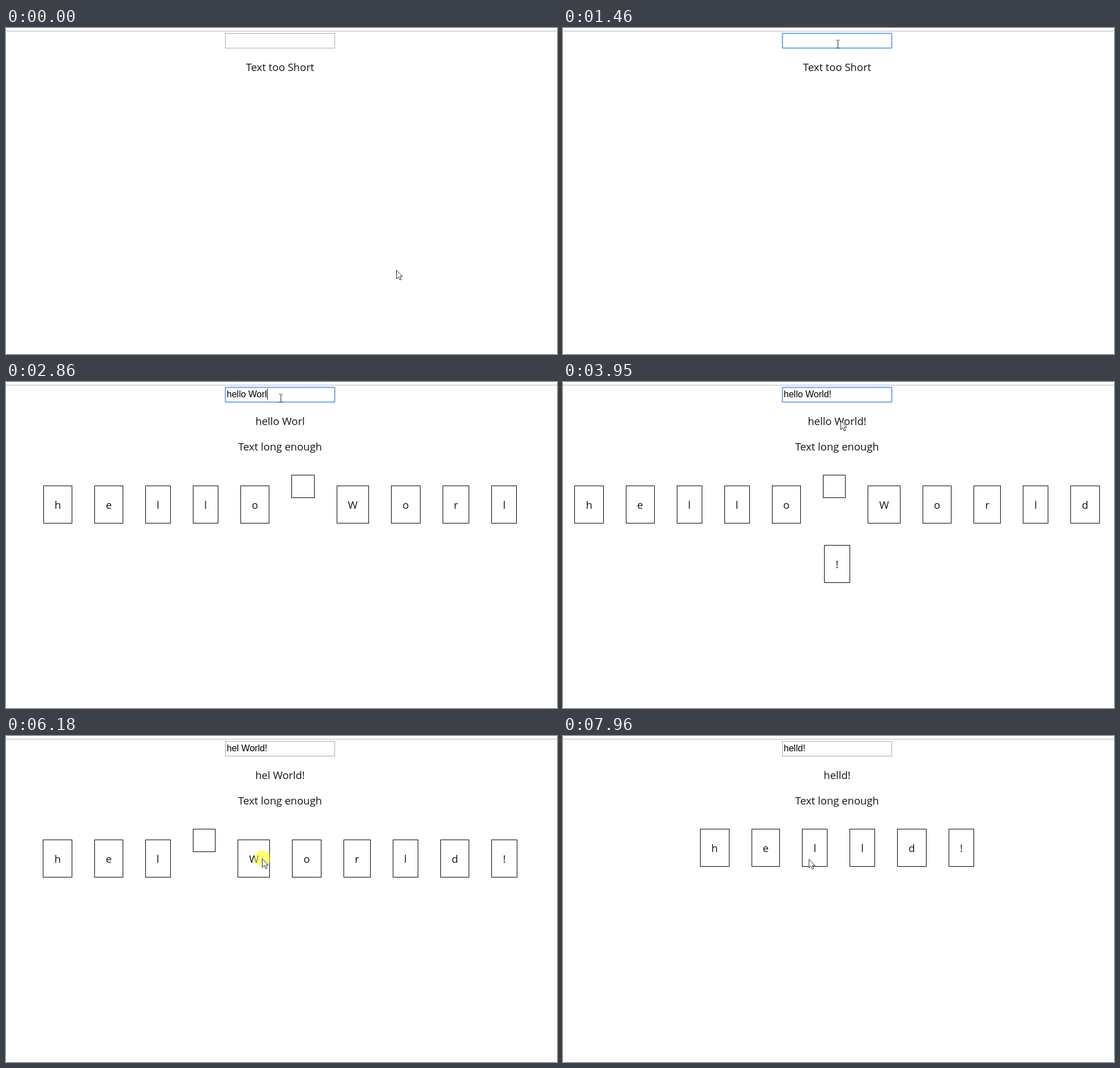
An HTML page for the animation above (8 s loop, 973 by 576 pixels).

```html
<!DOCTYPE html>
<html lang="en">
<head>
<meta charset="utf-8">
<title>Letter boxes</title>
<style>
  html, body { margin: 0; width: 100%; height: 100%; overflow: hidden; background: #fff; }
  svg { display: block; width: 973px; height: 576px; }
  text { font: 18.5px "Open Sans", "Noto Sans", sans-serif; text-anchor: middle; fill: #141414; }
  .typed { font: 16px "Liberation Sans", Arial, sans-serif; text-anchor: start; white-space: pre; fill: #000; }
  .box { fill: #fff; stroke: #000; shape-rendering: crispEdges; }
  .field { fill: #fff; stroke: #a9a9a9; }
  .field.focus { stroke: #6ea2ea; stroke-width: 2; }
</style>
</head>
<body>
<svg viewBox="0 0 973 576">
  <rect y="5" width="973" height="1" fill="#b6b6b6"/>
  <g id="page"></g>
  <g id="pointer">
    <circle id="halo" cx="1" cy=".5" r="14.5" fill="#ff0" fill-opacity=".5"/>
    <path id="arrow" d="M.5 .8V16.2L4.1 12.8 6.5 18.2 8.9 17.2 6.6 12H11.3Z" fill="#fff" stroke="#22223c"/>
    <path id="beam" d="M-2.5 -6.5H-.5L.5 -5.5 1.5 -6.5H3.5M.5 -5.5V6.5M-2.5 7.5H-.5L.5 6.5 1.5 7.5H3.5" fill="none" stroke="#222"/>
  </g>
</svg>
<script>
const LOOP = 8000, TICK = 76.3, BLINK = 545, GLIDE = 300;
const MID = 484, ROW_WIDTH = 968, FRAME = 40.4, GAP = 38.9;
const FIELD = { left: 387, right: 581, bottom: 36, textX: 389.8 };
const $ = id => document.getElementById(id);

// Typing comes in bursts: text, start, time per key
const bursts = [['hello', 1530, 138], [' W', 2330, 230], ['orld', 2710, 75], ['!', 3090, 0]];

// The pointer leaves for each stop, and presses there if it has a release time
const stops = [
  { leave: 70, press: 600, release: 690, x: 476, y: 40 },
  { leave: 830, press: 900, release: 1060, x: 485, y: 28 },
  { leave: 3870, press: 4030, x: 507, y: 192 },
  { leave: 4180, press: 4870, release: 4950, x: 390, y: 199 },
  { leave: 4950, press: 4950, x: 394, y: 210 },
  { leave: 5260, press: 5500, release: 5650, x: 312, y: 214 },
  { leave: 5730, press: 6180, release: 6260, x: 452, y: 216 },
  { leave: 6330, press: 6710, release: 6870, x: 564, y: 210 },
  { leave: 7180, press: 7330, release: 7410, x: 528, y: 208 },
  { leave: 7730, press: 7800, release: 7880, x: 478, y: 190 },
  { leave: 7960, press: 7960, x: 434, y: 217 }
];
const clicks = stops.filter(s => s.release);

const pen = document.createElement('canvas').getContext('2d');
function measure(s, font) {
  pen.font = font;
  return pen.measureText(s).width;
}
const glyphWidth = c => c === ' ' ? 0 : measure(c, '18.5px "Open Sans", "Noto Sans", sans-serif');
const typedWidth = s => measure(s, '16px "Liberation Sans", Arial, sans-serif');

// Boxes of one centred row; an empty box sits higher than its neighbours
function layRow(chars, top, spaced) {
  const widths = chars.map(c => glyphWidth(c) + FRAME);
  let x = MID - (widths.reduce((a, b) => a + b, 0) + GAP * (chars.length - 1)) / 2;
  return chars.map((c, i) => {
    const blank = c === ' ';
    const box = {
      c, blank, left: Math.round(x), right: Math.round(x + widths[i]), mid: x + widths[i] / 2,
      top: spaced && !blank ? top + 19 : top, height: blank ? 41 : 67
    };
    x += widths[i] + GAP;
    return box;
  });
}

function layout(s) {
  const first = [], rest = [];
  let used = 0;
  for (const c of s) {
    used += glyphWidth(c) + FRAME + GAP;
    (used > ROW_WIDTH ? rest : first).push(c);
  }
  return [...layRow(first, 164, s.includes(' ')), ...layRow(rest, 288, false)];
}

// Every state of the text: typed key by key, then clicked boxes drop out
const states = [{ at: 0, text: '' }];
const lastText = () => states[states.length - 1].text;
for (const [word, start, pace] of bursts)
  [...word].forEach((c, i) => states.push({ at: start + i * pace, text: lastText() + c }));
const typedStates = states.slice(1);
for (const { release, x, y } of clicks.filter(c => c.press > typedStates[typedStates.length - 1].at)) {
  const text = lastText();
  const hit = layout(text).findIndex(b =>
    x >= b.left && x < b.right && y >= b.top && y < b.top + b.height);
  if (hit >= 0) states.push({ at: release, text: text.slice(0, hit) + text.slice(hit + 1) });
}

const textAt = t => states.filter(s => s.at <= t).pop().text;

function focusAt(t) {
  const click = clicks.filter(c => c.press <= t).pop();
  return click && click.y < FIELD.bottom ? click.press : 0;
}

function caretAt(t) {
  const focus = focusAt(t);
  if (!focus) return false;
  const last = Math.max(focus + 10, ...typedStates.map(s => s.at).filter(at => at <= t));
  return Math.floor(Math.max(0, t - last) / BLINK) % 2 === 0;
}

function pointerAt(t) {
  const now = Math.floor((t + 16) / TICK) * TICK + 30;
  let x = 689, y = 427;
  for (const s of stops.filter(s => s.leave <= now)) {
    const u = Math.min(1, (now - s.leave) / (Math.min(GLIDE, s.press - s.leave) || 1));
    const e = u * u * (3 - 2 * u);
    x += (s.x - x) * e;
    y += (s.y - y) * e;
  }
  return [Math.round(x), Math.round(y)];
}

const label = (s, x, y, cls = '') => `<text class="${cls}" x="${x}" y="${y}">${s}</text>`;

const drawBox = b =>
  `<rect class="box" x="${b.left + .5}" y="${b.top + .5}" width="${b.right - b.left - 1}" height="${b.height - 1}"/>`
  + (b.blank ? '' : label(b.c, b.mid, b.top + 41));

function drawPage(s, focused, caret) {
  const caretX = Math.round(FIELD.textX + typedWidth(s));
  const width = FIELD.right - FIELD.left - 1;
  return `<rect class="field ${focused ? 'focus' : ''}" x="${FIELD.left + .5}" y="9.5" width="${width}" height="26" rx="${focused ? 1 : 0}"/>`
    + label(s, FIELD.textX, 27, 'typed')
    + (caret ? `<rect x="${caretX}" y="12" width="1" height="19"/>` : '')
    + label(s.trim(), MID, 76)
    + label(s.length < 5 ? 'Text too Short' : 'Text long enough', MID, s ? 121 : 76)
    + layout(s).map(drawBox).join('');
}

const show = (id, on) => { $(id).style.display = on ? '' : 'none'; };

let shown = '';
function draw() {
  const t = performance.now() % LOOP;
  const html = drawPage(textAt(t), focusAt(t), caretAt(t));
  if (html !== shown) $('page').innerHTML = shown = html;

  const [x, y] = pointerAt(t), overField = y < FIELD.bottom;
  $('pointer').setAttribute('transform', `translate(${x} ${y})`);
  show('arrow', !overField);
  show('beam', overField);
  show('halo', clicks.some(c => t >= c.press && t < c.release));
  requestAnimationFrame(draw);
}
draw();
</script>
</body>
</html>
```
